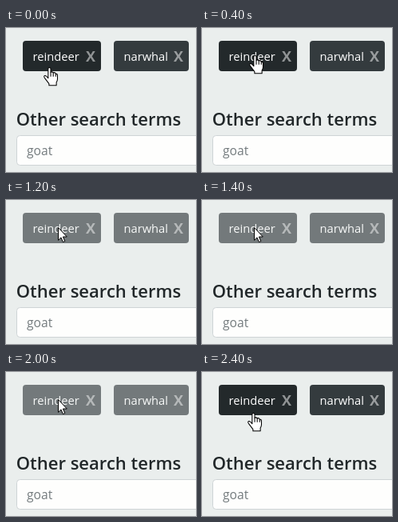
An HTML page for the animation above (2600 ms loop, 238 px wide and 180 px high).

```html
<!DOCTYPE html>
<html lang="en">
<head>
<meta charset="utf-8">
<title>Search terms</title>
<style>
  html, body { margin: 0; width: 100%; height: 100%; overflow: hidden; background: #eaeeed; }
  svg { display: block; width: 238px; height: 180px; font-family: "Open Sans", "Noto Sans", sans-serif; }
  .tag text { font-size: 14.7px; font-weight: 500; fill: #fff; }
  .tag .x { font-size: 18px; font-weight: 700; fill-opacity: .5; }
  .cursor { fill: #fff; stroke: #000; stroke-linejoin: round; }
</style>
</head>
<body>
<svg viewBox="0 0 238 180">
  <g class="tag">
    <rect id="first" x="21" y="16" width="98" height="38" rx="4" fill="#23292b"/>
    <text x="33.5" y="41">reindeer</text>
    <text class="x" x="100" y="42">X</text>
  </g>
  <g class="tag">
    <rect x="135" y="16" width="94" height="38" rx="4" fill="#343b3e"/>
    <text x="147.5" y="41">narwhal</text>
    <text class="x" x="210" y="42">X</text>
  </g>

  <text x="12.7" y="122" font-size="22.05" font-weight="600" fill="#212729">Other search terms</text>

  <rect x="13.5" y="134.5" width="240" height="37" rx="4" fill="#fefefd" stroke="#ced4d6"/>
  <text x="26" y="159" font-size="15.6" fill="#747b7e">goat</text>

  <g id="hand">
    <g class="cursor" transform="scale(1.06)">
      <path d="M5.5 13V2Q5.5 .5 7 .5T8.5 2V6Q10.3 4.9 11.5 6.5Q13.5 5.7 14.3 7.5Q16.5 7.5 16.5 9.7V14Q16.5 16 15.2 18V21.5H6.5V19.5L2 13.6Q-.2 10.8 1.3 10Q3 9.4 5.5 13Z"/>
      <path d="M8.5 6V11M11.5 6.5V11M14.4 7.5V11" fill="none"/>
    </g>
  </g>
  <path id="arrow" class="cursor" d="M65.5 34.5V50.3L69 46.9L71.4 52.5L73.8 51.5L71.4 46H76.3Z"/>
</svg>
<script>
  const LOOP = 2600;
  const at = (x, y) => `translate(${x}px, ${y}px)`;

  // Each row is [start in ms, value]; values hold until the next row.
  function hold(el, prop, rows) {
    const frames = rows.map(([ms, value]) =>
      ({ offset: ms / LOOP, [prop]: value, easing: "steps(1, end)" }));
    frames.push({ offset: 1, [prop]: rows[rows.length - 1][1] });
    el.animate(frames, { duration: LOOP, iterations: Infinity });
  }

  const get = id => document.getElementById(id);
  const shown = (a, b) => [[0, a], [1000, b], [2200, a]];

  hold(get("hand"), "transform", [[0, at(47, 49)], [200, at(59, 34)], [2400, at(57, 51)]]);
  hold(get("hand"), "opacity", shown(1, 0));
  hold(get("arrow"), "opacity", shown(0, 1));
  hold(get("first"), "fill", shown("#23292b", "#343b3e"));
  document.querySelectorAll(".tag").forEach(tag => hold(tag, "opacity", shown(1, .65)));
</script>
</body>
</html>
```
